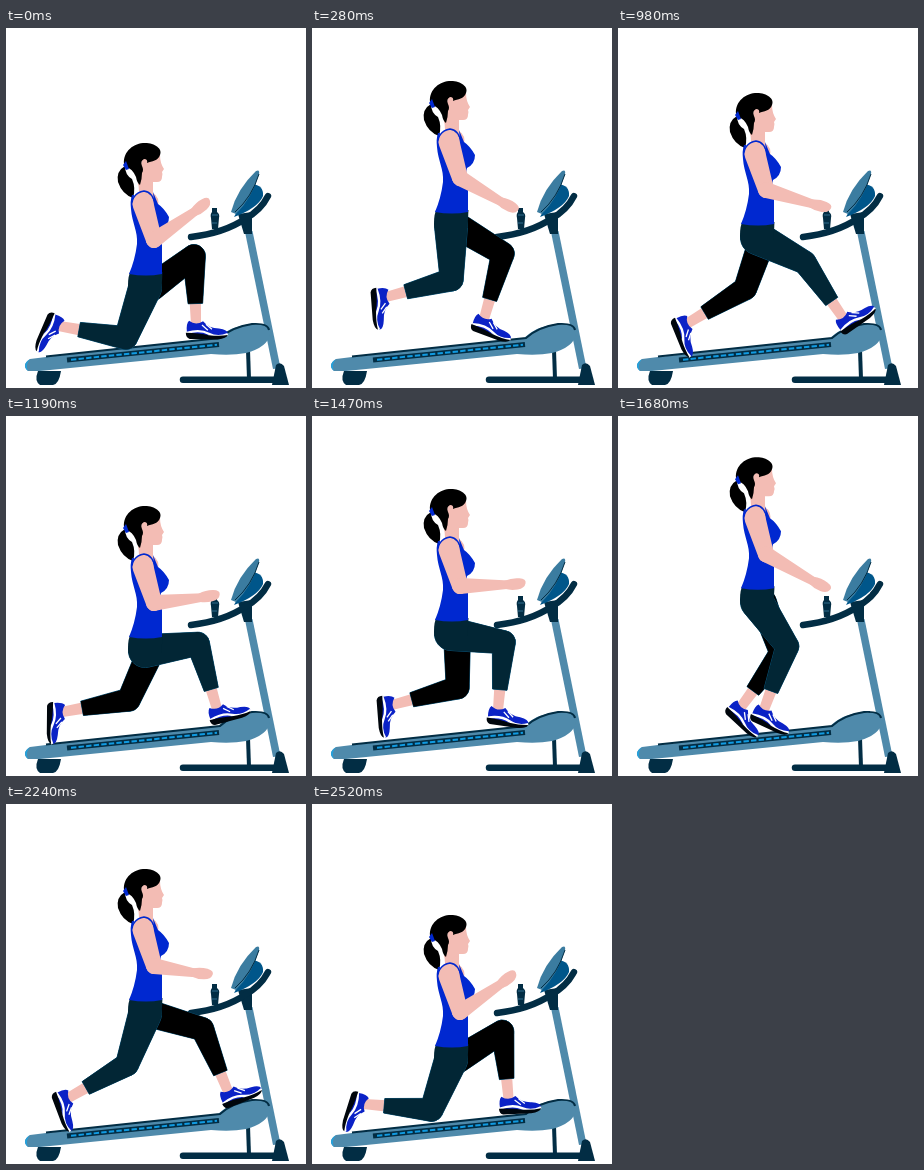
An HTML page for the animation above (2.59 s loop, 300 by 360 pixels).

```html
<!DOCTYPE html>
<html lang="en">
<head>
<meta charset="utf-8">
<title>Treadmill lunges</title>
<style>
html, body { margin: 0; width: 100%; height: 100%; overflow: hidden; background: #fff; }
svg { display: block; width: 300px; height: 360px; }
</style>
</head>
<body>
<svg viewBox="0 0 300 360" xmlns="http://www.w3.org/2000/svg">
  <defs>
    <g id="shoe">
      <path d="M-9 8Q-10 0-7-3Q0 2 7-3Q13 4 23 4Q32 5 32 9L30 11H-8Z" fill="#0b22c6"/>
      <path d="M-9 9Q4 5 13 9.5T32 9.5" fill="none" stroke="#fff" stroke-width="2.4"/>
      <path d="M6 1L12 6M10 0L16 5" stroke="#fff" stroke-width="1.3"/>
      <path d="M-10 9Q4 9 13 11Q24 12 32 10.5Q31 14 22 15H-6Q-10 14-10 9Z" fill="#00060c"/>
    </g>
  </defs>

  <g id="treadmill">
    <path d="M242 322L243 351" stroke="#022d44" stroke-width="4"/>
    <path d="M177 351.7H268" stroke="#022d44" stroke-width="6.5" stroke-linecap="round"/>
    <path d="M239 204L246.5 203L274.5 340L267 341Z" fill="#4f8aab"/>
    <path d="M270 337Q274 333 278 338L283 357H266Z" fill="#022d44"/>
    <path d="M32 343H55Q53 356 47 357H34Q28 353 32 343Z" fill="#022d44"/>
    <path d="M24 331L40 329L212 310Q225 298 244 296Q266 294 264 306Q262 319 240 325Q225 328 205 326L34 343H22Q15 337 24 331Z" fill="#4f8aab"/>
    <path d="M24 331Q19 337 22 343Q15 337 24 331Z" fill="#26a0da"/>
    <path d="M40 328.5L214 310Q226 299 246 296Q262 295 263 302" fill="none" stroke="#022d44" stroke-width="2"/>
    <path d="M61 332L213 316.5" stroke="#022d44" stroke-width="5"/>
    <path d="M65 331.7L211 316.7" stroke="#109be2" stroke-width="2" stroke-dasharray="5.4 2.2"/>
    <path d="M232 186L246 184L246 206H238Z" fill="#022d44"/>
    <path d="M235 176L246 156Q258 157 257 168Q252 180 228 189Z" fill="#00568a"/>
    <path d="M185 209Q218 205 239 191Q255 182 262 168" fill="none" stroke="#022d44" stroke-width="6.4" stroke-linecap="round"/>
    <path d="M225 184Q231 161 250 143Q254 141 253 146Q246 170 230 186Z" fill="#3b7ca0"/>
    <path d="M229 184Q246 169 253 146" fill="none" stroke="#022d44" stroke-width="1"/>
    <path d="M206 180H211V184Q214 186 213 190L212 201H206L205 190Q204 186 206 184Z" fill="#022d44"/>
    <path d="M206 187H212M206 195H211" stroke="#3b7ca0" stroke-width=".8"/>
  </g>

  <g id="far"></g>
  <g id="near"></g>

  <g id="body">
    <path d="M119 23Q110 28 112 39Q116 51 127 55Q130 45 126 36Q119 32 119 23Z"/>
    <path d="M132 34L147 34L147 50Q154 54 152 64L140 72L127 64Q127 52 133 49Z" fill="#f3bcb4"/>
    <path d="M136 15L154 12Q154 20 158 26L156 29Q157 31 156 34Q156 39 151 39H146Q141 46 132 42Z" fill="#f3bcb4"/>
    <path d="M118 21C117 8 128 0 139 0C149 0 157 6 154 12C152 18 146 18 141 20Q142 16 138 16Q134 18 136 23Q138 27 136 30Q136 36 134 42Q131 40 130 34Q126 25 121 25Z"/>
    <path d="M117 22L120 18L123 26L120 27Z" fill="#0028d0"/>
    <path d="M126 52Q124 58 125 66C126 80 132 88 131 101Q129 117 123 131Q140 134 156 131V102Q153 93 155 87Q163 83 163 74Q158 65 152 61L147 49Q149 62 145 72L130 68Q126 60 128 52Z" fill="#0028d0"/>
    <path d="M126 66Q125 50 138 48Q147 49 149 62" fill="none" stroke="#0028d0" stroke-width="1.6"/>
  </g>
  <g id="arm" fill="#f3bcb4"></g>
</svg>
<script>
const LOOP = 2590, STEP = 70, THIGH = 53.5, SHIN = 68, NS = "http://www.w3.org/2000/svg";
const { PI, sin, cos, atan2, acos, hypot } = Math;
const $ = id => document.getElementById(id);

// Top of the head: time, y
const lift = [
  [0, 115], [280, 53], [490, 32], [700, 38], [1190, 90], [1295, 101],
  [1470, 73], [1750, 36], [1960, 43], [2240, 65], [2520, 111]
];
// Ankles: time, x, y
const nearSteps = [
  [0, 53, 298], [280, 74, 269], [700, 214, 284], [1190, 211, 293],
  [1470, 186, 294], [1960, 89, 294], [2240, 62, 294]
];
const farSteps = [
  [0, 190, 296], [280, 172, 291], [700, 109, 292], [1190, 56, 296],
  [1470, 80, 289], [1960, 187, 295], [2200, 221, 288]
];

// Smooth periodic curve through key points
function sample(keys, t) {
  const n = keys.length;
  const at = i => keys[(i + n) % n];
  const time = i => at(i)[0] + LOOP * Math.floor(i / n);
  const span = i => time(i + 1) - time(i);
  let i = n - 1;
  while (at(i)[0] > t) i--;
  const h = span(i), u = (t - time(i)) / h, s = u * u * (3 - 2 * u);
  return at(i).slice(1).map((v, k) => {
    const slope = j => (at(j + 1)[k + 1] - at(j)[k + 1]) / span(j);
    const tangent = j => (slope(j - 1) * span(j) + slope(j) * span(j - 1)) / (span(j - 1) + span(j));
    return v + slope(i) * h * s + h * u * (1 - u) * (
      (1 - u) * tangent(i) - u * tangent(i + 1));
  });
}

// Knee from hip and ankle; the leg stretches a little when straight
function bend(hx, hy, ax, ay) {
  const d = hypot(ax - hx, ay - hy), scale = Math.max(1, d / (THIGH + SHIN) * 1.005);
  const p = THIGH * scale, q = SHIN * scale;
  const turn = acos((p * p + d * d - q * q) / (2 * p * d));
  const a = atan2(ay - hy, ax - hx) - turn;
  return [hx + p * cos(a), hy + p * sin(a)];
}

// Tapered limb, r1 >= r2, optionally cut flat at the thin end
function limb(x1, y1, r1, x2, y2, r2, flat) {
  const a = atan2(y2 - y1, x2 - x1);
  const b = acos((r1 - r2) / hypot(x2 - x1, y2 - y1));
  const p = (x, y, r, q) => (x + r * cos(q)).toFixed(2) + " " + (y + r * sin(q)).toFixed(2);
  const end = flat ? "L" : `A${r2} ${r2} 0 0 0 `;
  const start = p(x1, y1, r1, a + b);
  return `M${start}L${p(x2, y2, r2, a + b)}${end}${p(x2, y2, r2, a - b)}` +
    `L${p(x1, y1, r1, a - b)}A${r1} ${r1} 0 1 0 ${start}Z`;
}

function add(parent, tag, attrs = {}) {
  const el = document.createElementNS(NS, tag);
  for (const k in attrs) el.setAttribute(k, attrs[k]);
  return parent.appendChild(el);
}

function makeLeg(id, color, steps, hipX, hipR) {
  const g = $(id);
  const skin = add(g, "path", { fill: "#f3bcb4" });
  const shoe = add(g, "use", { href: "#shoe" });
  const edge = add(g, "path", { stroke: "#0b5479", "stroke-width": 1 });
  const pants = add(g, "path", { fill: color });
  const seat = add(g, "path", { fill: color });
  return (t, top) => {
    const [ax, ay] = sample(steps, t);
    const hipY = top + 145, cuff = 0.69;
    const [kx, ky] = bend(hipX, hipY, ax, ay);
    const shin = atan2(kx - ax, ay - ky) * 180 / PI;
    skin.setAttribute("d", limb(kx, ky, 7, ax, ay, 5));
    shoe.setAttribute("transform", `translate(${ax} ${ay}) rotate(${shin * 1.1 + 3})`);
    const d = limb(hipX, hipY, hipR, kx, ky, 11.5) +
      limb(kx, ky, 11.5, kx + (ax - kx) * cuff, ky + (ay - ky) * cuff, 7.3, true);
    edge.setAttribute("d", d);
    pants.setAttribute("d", d);
    if (id === "near") {
      seat.setAttribute("d", `M124 ${top + 129}H156.5L155.5 ${top + 147}H122.5Q121 ${top + 138} 124 ${top + 129}Z`);
    }
  };
}

const farLeg = makeLeg("far", "#000", farSteps, 145, 13.5);
const nearLeg = makeLeg("near", "#022635", nearSteps, 139, 16.5);
const upperArm = add($("arm"), "path");
const forearm = add($("arm"), "path");
const palm = add($("arm"), "path", { d: "M-17-4Q-9-7-2-6Q5-5 4-1Q3 4-4 5Q-11 6-17 4Z" });

function draw(t) {
  const phase = 2 * PI * t / LOOP;
  const [top] = sample(lift, t);
  farLeg(t, top);
  nearLeg(t, top);
  $("body").setAttribute("transform", `translate(0 ${top})`);
  const ex = 148, ey = top + 97;
  const hx = 205.5 - 4.5 * cos(phase), hy = 175 + 7 * sin(3 * phase);
  const a = atan2(hy - ey, hx - ex);
  upperArm.setAttribute("d", limb(137, top + 61, 10.5, ex, ey, 8));
  forearm.setAttribute("d", limb(ex, ey, 8, hx - 13 * cos(a), hy - 13 * sin(a), 4.2));
  palm.setAttribute("transform", `translate(${hx} ${hy}) rotate(${a * 180 / PI})`);
}

const begin = performance.now();
function tick() {
  const t = (performance.now() - begin) % LOOP;
  draw(Math.floor(t / STEP) * STEP);
  requestAnimationFrame(tick);
}
tick();
</script>
</body>
</html>
```
